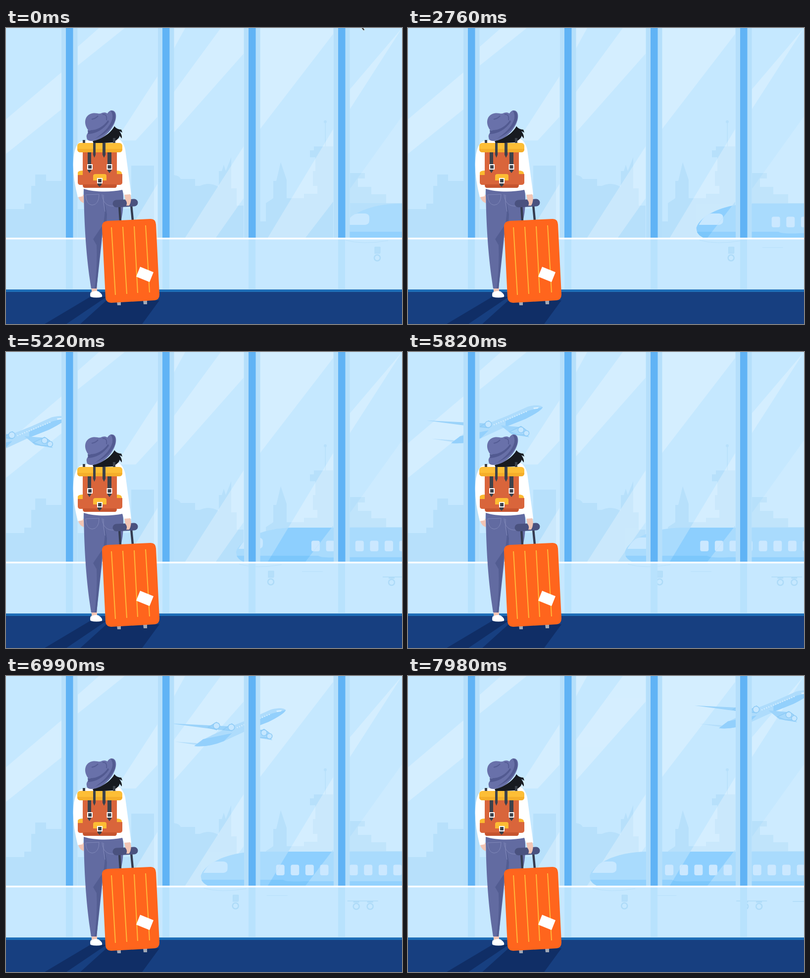
An HTML page that plays this animation: 800 by 600 pixels, repeating every 8 s.

```html
<!DOCTYPE html>
<html lang="en">
<head>
<meta charset="utf-8">
<title>Airport window</title>
<style>
  html, body { margin: 0; width: 100%; height: 100%; overflow: hidden; background: #c5e8ff; }
  svg { display: block; width: 100vw; height: 100vh; }
</style>
</head>
<body>
<svg viewBox="0 0 800 600">
  <defs>
    <clipPath id="tint"><path d="M529 425L661 205V352L605 425Z"/></clipPath>
    <g id="airliner">
      <path class="hull" d="M0 405C4 388 40 357 115 356H480V425H14C4 420 0 413 0 405Z"/>
      <path class="belly" d="M1 413H166Q172 418 210 416H480V425H14Q4 420 1 413Z"/>
      <path fill="#c8e8ff" d="M5 399C10 390 18 378 30 376H46Q54 377 54 384V390Q54 398 46 399Z"/>
      <g class="windows" fill="#cbe8ff"></g>
    </g>
  </defs>

  <rect width="800" height="600" fill="#c5e8ff"/>

  <!-- skyline -->
  <g fill="#b7e0fb">
    <path d="M0 367H37V356H51V320H59V297H81V310H112V425H0Z"/>
    <path d="M145 367H253V279H299V425H145Z"/>
    <path d="M339 298Q350 299 353 306H382V320H392Q410 311 430 322V290H436L440 277L444 290L455 262V325H466V360H480V425H339Z"/>
    <path d="M513 392H525V355L540 345V310H546L555 272L567 308V345H602V336H629V320H620V290H625V262H614V248H622V240H661V425H513Z"/>
    <path d="M644.500 190h1.500v52h-1.500Z"/><circle cx="645" cy="190" r="3"/>
    <path d="M695 294H725V305H711V322H738V337H768V355H800V425H695Z"/>
  </g>

  <!-- reflections -->
  <g fill="#fff" opacity=".27">
    <path d="M0 185L112 90V165L0 255Z"/>
    <path d="M145 38L188 0H240L145 76Z"/>
    <path d="M306 98V180L262 228H222Z"/>
    <path d="M306 316V425H240Z"/>
    <path d="M339 0H362L339 42Z"/>
    <path d="M339 130L434 0H480V52L339 212Z"/>
    <path d="M362 425L480 240V345L424 425Z"/>
    <path d="M513 0H661V12L513 205Z"/>
    <path d="M529 425L661 205V352L605 425Z"/>
    <path d="M695 124L800 0L695 164Z"/>
    <path d="M695 326L800 179V355H695Z" opacity=".5"/>
  </g>

  <g id="jet">
    <path fill="#b4defb" d="M-40 -9L4 -6L20 0Z"/>
    <path fill="#9bd3fa" d="M-50 -46L70 -40L88 -30L48 -33Z"/>
    <path fill="#aedcfc" d="M0 0C16 -15 46 -26 70 -38L115 -56L155 -74Q178 -80 185 -73Q182 -65 150 -49L110 -33L60 -10Q28 3 0 0Z"/>
    <path fill="#93d0fc" d="M0 0L18 -14L76 -26L60 -10Q28 3 0 0ZM150 -49Q182 -65 185 -73L157 -66L110 -45V-33Z"/>
    <path fill="#9dd4fb" d="M100 -36L136 -33L158 -12L122 -18Z"/>
    <g fill="#c6e7ff" stroke="#8ecbf6" stroke-width="1.500">
      <path d="M45 -48L28 -38L45 -33ZM76 -45L58 -33L76 -31Z" fill="#9ad3fb"/>
      <circle cx="45" cy="-41" r="6.500"/><circle cx="75" cy="-38" r="6.500"/>
      <path d="M141 -34L118 -23L134 -17L156 -17L151 -27Z" fill="#a7d9fc"/>
      <circle cx="141" cy="-27" r="6"/><circle cx="152" cy="-20" r="5.500"/>
    </g>
    <path d="M86 -37L154 -65" stroke="#d6efff" stroke-width="2.500" stroke-dasharray="2 3"/>
    <path d="M166 -72L177 -73L175 -70L167 -69Z" fill="#d9f0ff"/>
  </g>

  <use href="#airliner" class="taxi" fill="#a9dbfd" style="--belly:#92d1fd"/>
  <g clip-path="url(#tint)"><use href="#airliner" class="taxi" fill="#8dcffe" style="--belly:#7cc7fb"/></g>

  <!-- low glass panel, with the landing gear behind it -->
  <rect y="425" width="800" height="106" fill="#c6e8ff"/>
  <g class="taxi" fill="none" stroke="#aedbf8" stroke-width="2.500">
    <path d="M6 430Q40 440 92 431M133 445H175" stroke-width="1" opacity=".6"/>
    <path d="M65 444h11v12h-11ZM64 457h12" fill="#b5dffa" stroke-width="1"/>
    <path d="M296 456H358M410 457H440" stroke-width="1.500"/>
    <path d="M308 458h12M336 458h12"/>
    <circle cx="70" cy="466" r="6"/><circle cx="314" cy="467" r="6"/><circle cx="342" cy="467" r="6"/>
  </g>
  <g id="pillars"></g>
  <rect y="425" width="800" height="3.500" fill="#fff"/>
  <rect y="530" width="800" height="6" fill="#1e6eb7"/>
  <rect y="535" width="800" height="65" fill="#173f80"/>
  <path fill="#102e66" d="M170 545H203L122 600H78ZM203 552H310L275 600H150Z"/>

  <!-- traveller -->
  <g>
    <path fill="#f2c5b4" d="M146 338H157V355Q149 352 146 343ZM173 525H184V537H173Z"/>
    <path fill="#fff" d="M171 536Q180 531 187 534Q196 540 194 545Q183 548 171 545Q169 541 171 536Z"/>
    <path fill="#626ba1" d="M157 326L236 328Q240 365 230 400H197L199 381L183 528H172C163 470 158 410 157 326Z"/>
    <path fill="#535d92" d="M176 428L195 400L183 528H179Q185 480 183 440ZM199 381Q201 365 199 350L204 378L203 395H197Z"/>
    <path fill="none" stroke="#8189ba" d="M161 338Q162 358 174 359Q188 358 188 337ZM194 337Q196 362 218 361M197 338V355L200 372"/>
    <path fill="#fff" d="M149 231C165 224 190 230 222 224Q236 225 241 247L253 338L239 341L235 328C212 333 178 333 157 326L155 341L145 343Q134 299 136 268Q138 239 149 231Z"/>
    <path fill="#171a20" d="M175 229C202 223 216 206 219 199Q224 206 233 206L235 212L229 209Q235 217 234 224L229 218Q231 223 216 232L177 234Z"/>
    <path fill="#6870a8" d="M163 222C160 210 180 203 188 198C203 190 200 171 212 167C223 166 225 179 219 193C210 214 190 229 172 229Q163 229 163 222Z"/>
    <path fill="#525a91" d="M212 168Q223 167 220 187Q211 211 180 224Q205 208 213 189Q218 178 212 168ZM165 207Q184 210 205 184L208 190Q192 213 166 215Z"/>
    <path fill="#6971aa" d="M166 207C155 192 160 176 174 173C185 171 187 176 194 172C207 168 211 181 206 187Q190 209 166 207Z"/>
    <path fill="none" stroke="#555d95" stroke-width="2" d="M186 178Q181 184 173 185M195 175Q205 174 203 187"/>
  </g>

  <!-- backpack -->
  <g>
    <path fill="#3c424b" d="M155 227h5v8h-5ZM216 223h5v12h-5Z"/>
    <path fill="#fbb930" d="M145 301V293Q146 289 156 289V301ZM223 289Q233 289 234 294V301H223Z"/>
    <path fill="#d9653b" d="M155 249H224V319Q224 324 219 324H160Q155 324 155 319ZM145 298H156V318H149Q145 317 145 313ZM223 296H235V314Q234 318 229 318H223Z"/>
    <path fill="#c6552f" d="M156 317H223V319Q223 324 219 324H160Q155 324 156 317Z"/>
    <rect x="144" y="233" width="91" height="19" rx="6" fill="#fdbe36"/>
    <path fill="#f5ae2a" d="M144 245H235Q235 252 229 252H150Q144 252 144 245Z"/>
    <path fill="#fdbc34" d="M176 309V300Q176 296 181 296H199Q203 296 203 300V309Z"/>
    <path fill="#3c424b" d="M176 233h5v24l-2.500 6l-2.500-6ZM195 233h6v24l-3 6l-3-6ZM165 252h7v37l-3.500 5l-3.500-5ZM205 252h8v37l-4 5l-4-5ZM185 305h8v13l-4 4l-4-4Z"/>
    <path fill="#3c424b" stroke="#fff" stroke-width="2" d="M165 277h9v9h-9ZM204.500 277h9v9h-9ZM185 305h9v9h-9Z"/>
  </g>

  <!-- suitcase -->
  <g>
    <path stroke="#343b50" stroke-width="4.500" d="M229 359L231 391M253 359L256 390"/>
    <path fill="#a1a9b7" d="M224 554h8v8h-7ZM277 552h8v8h-7Z"/>
    <path fill="#ff651d" d="M206 391L291 387Q302 386 303 398L310 540Q310 551 300 552L213 557Q202 557 201 546L194 404Q193 392 206 391Z"/>
    <path fill="none" stroke="#ffb83b" stroke-width="2" d="M213 404L221 541M236 403L244 539M259 402L266 537M282 400L290 536"/>
    <path fill="#fff" d="M271 484L298 495L290 515L263 504Z"/>
    <path fill="#f2c5b4" d="M239 338L251 337Q255 349 249 361L241 360Q244 354 242 349Z"/>
    <path fill="none" stroke="#4a527f" stroke-width="15" stroke-linecap="round" d="M223 356L259 354"/>
    <path fill="#f2c5b4" d="M240 340L251 338Q255 349 249 360L243 360Q246 354 241 348Z"/>
  </g>

  <path id="pointer" fill="#222" stroke="#fff" stroke-width=".6" d="M716 0H725L722 1L725 4L722 5L719 1Z"/>
</svg>
<style>
  .belly { fill: var(--belly); }
</style>
<script>
  const LOOP = 8000;
  const $ = selector => document.querySelector(selector);
  const rect = (x, y, w, h, fill) =>
    `<rect x="${x}" y="${y}" width="${w}" height="${h}" fill="${fill}"/>`;

  $('#pillars').innerHTML = [121, 316, 490, 671].map(x =>
    rect(x - 9, 0, 32.5, 425, '#b5dffb') +
    rect(x, 0, 14.5, 425, '#60b3f5') +
    rect(x, 428, 14, 101, '#b8e2fd')).join('');

  $('.windows').innerHTML = Array.from({ length: 11 }, (_, i) =>
    `<rect x="${152 + 29.6 * i}" y="382.5" width="17" height="21.500" rx="4"/>`).join('');

  const taxiing = document.querySelectorAll('.taxi');

  function draw(now) {
    const t = now % LOOP, s = t / 1000;
    // Taxiing speed rises to a peak at four seconds, then falls away.
    const nose = 680 - 48.75 * s + 0.6 * ((s - 4) ** 3 + 64);
    taxiing.forEach(el => el.setAttribute('transform', `translate(${nose})`));
    const flown = t - 6990;
    $('#jet').setAttribute('transform', `translate(${380 + 0.2505 * flown} ${142 - 0.0365 * flown})`);
    $('#pointer').style.display = t < 1200 ? '' : 'none';
  }

  const start = performance.now();
  (function tick() {
    draw(performance.now() - start);
    requestAnimationFrame(tick);
  })();
</script>
</body>
</html>
```
